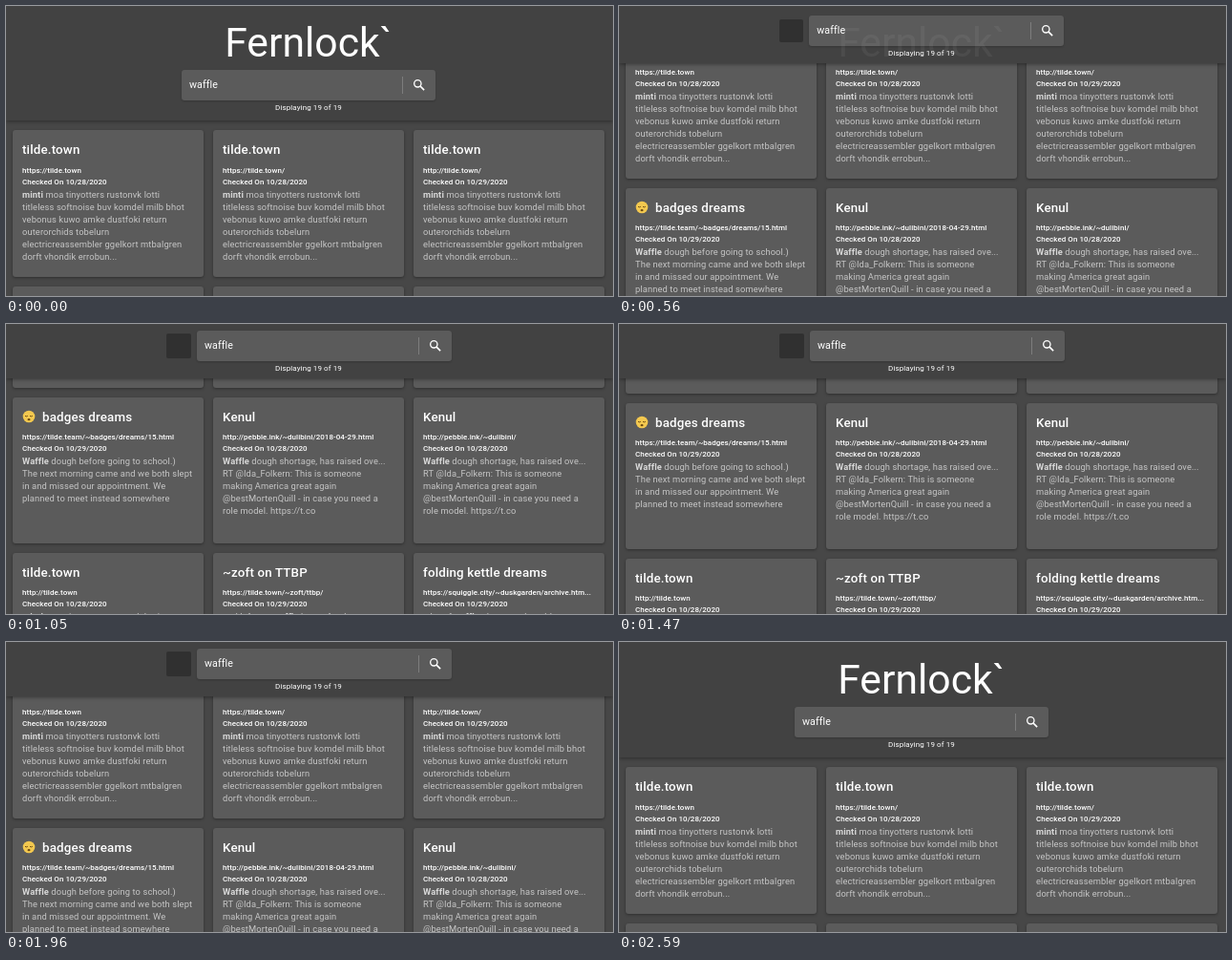
Write an HTML page that moves like this. It is 636x304 px and loops after 2.87 s.

```html
<!DOCTYPE html>
<html lang="en">
<head>
<meta charset="utf-8">
<title>Search results</title>
<style>
html, body { margin: 0; width: 100%; height: 100%; overflow: hidden; background: #474747; }
body { position: relative; color: #fff; font-family: Roboto, Arial, sans-serif; white-space: nowrap; }
body * { box-sizing: border-box; }
#stage { position: absolute; inset: 0; width: 636px; height: 304px; overflow: hidden; }
#list, #bar, #bar > *, .card { position: absolute; }
#list { left: 0; top: 0; will-change: transform; }
.card { width: 200px; height: 153.3px; padding: 11px 10px; border-radius: 3px; background: #5b5b5b; overflow: hidden;
  box-shadow: 0 1px 3px rgba(0,0,0,.35); }
h2 { margin: 0 0 5.3px; font: 500 13.33px/20px Roboto, Arial, sans-serif; letter-spacing: .0125em; }
h2 svg { width: 14px; height: 14px; margin-right: 7px; vertical-align: -2px; }
.meta { font-size: 8px; line-height: 12px; font-weight: 500; letter-spacing: .04px; }
.body { font-size: 9.33px; line-height: 13px; letter-spacing: .115px; color: #c6c6c6; }
.body b { color: #d8d8d8; }
#bar { left: 0; top: 0; width: 636px; background: #424242; box-shadow: 0 1px 4px rgba(0,0,0,.4); overflow: hidden; }
#logo { background: #303030; border-radius: 2px; }
#box { height: 32px; border-radius: 3px; background: #5b5b5b; box-shadow: 0 1px 2px rgba(0,0,0,.2); }
#box span { position: absolute; left: 8px; top: 8px; font-size: 10.67px; line-height: 16px; letter-spacing: .1px; }
#box i { position: absolute; right: 34px; top: 7px; width: 1px; height: 18px; background: #7d7d7d; }
#box svg { position: absolute; right: 9.5px; top: 8px; width: 16px; height: 16px; }
#name, #count { left: 0; width: 634px; text-align: center; }
#name { font-size: 42.67px; line-height: 50px; }
#count { font-size: 8px; line-height: 12px; letter-spacing: .1px; }
</style>
</head>
<body>
<div id="stage">
  <div id="list"></div>
  <div id="bar">
    <div id="logo"></div>
    <div id="box"><span>waffle</span><i></i>
      <svg viewBox="0 0 24 24" fill="none" stroke="#fff" stroke-width="2">
        <circle cx="9.5" cy="9.5" r="5.5"/><path d="M13.7 13.7l6 6" stroke-width="2.4"/>
      </svg>
    </div>
    <div id="name">Fernlock`</div>
    <div id="count">Displaying 19 of 19</div>
  </div>
</div>
<script>
const $ = id => document.getElementById(id);
const list = $('list'), bar = $('bar'), logo = $('logo'), box = $('box'), title = $('name'), count = $('count');

const members = `<b>minti</b> moa tinyotters rustonvk lotti
titleless softnoise buv komdel milb bhot
vebonus kuwo amke dustfoki return
outerorchids tobelurn
electricreassembler ggelkort mtbalgren
dorft vhondik errobun...`;
const news = `<b>Waffle</b> dough shortage, has raised ove...
RT @Ida_Folkern: This is someone
making America great again
@bestMortenQuill - in case you need a
role model. https://t.co`;
const diary = `<b>Waffle</b> dough before going to school.)
The next morning came and we both slept
in and missed our appointment. We
planned to meet instead somewhere`;
const sleepy = `<svg viewBox="0 0 14 14" fill="none" stroke="#6b4a12"><circle cx="7" cy="7" r="6.3" fill="#f3c84f" stroke="none"/>
<path d="M3 6.3q1.4 1.2 2.8 0M8 6.3q1.4 1.2 2.8 0"/><ellipse cx="7" cy="10.2" rx="1.5" ry="1.1" fill="#6b4a12" stroke="none"/></svg>`;

// title, address, day in October, body
const cards = [
  ['tilde.town', 'https://tilde.town', 28, members],
  ['tilde.town', 'https://tilde.town/', 28, members],
  ['tilde.town', 'http://tilde.town/', 29, members],
  [sleepy + 'badges dreams', 'https://tilde.team/~badges/dreams/15.html', 29, diary],
  ['Kenul', 'http://pebble.ink/~dulibini/2018-04-29.html', 28, news],
  ['Kenul', 'http://pebble.ink/~dulibini/', 28, news],
  ['tilde.town', 'http://tilde.town', 28, members],
  ['~zoft on TTBP', 'https://tilde.town/~zoft/ttbp/', 29, 'and leftover <b>waffle</b> batter for the rest'],
  ['folding kettle dreams', 'https://squiggle.city/~duskgarden/archive.htm...', 29, 'a lot of <b>waffle</b> plates on the table']
];
list.innerHTML = cards.map(([head, url, day, text], i) => {
  const left = 7 + i % 3 * 210, top = 131.4 + Math.floor(i / 3) * 163.2;
  return `<div class="card" style="left:${left}px;top:${top}px"><h2>${head}</h2>
    <div class="meta">${url}<br>Checked On 10/${day}/2020</div>
    <div class="body">${text.replace(/\n/g, '<br>')}</div></div>`;
}).join('');

// Scroll position over time: [ms, px], joined by smooth curves
const path = [[0, 1], [210, 1], [560, 104], [1050, 218], [1260, 221], [1330, 221],
  [1470, 212], [1750, 146], [2170, 58], [2590, 0], [2870, 0]];

function slope(i) {
  const a = path[i - 1], p = path[i], b = path[i + 1];
  if (!a || !b || (p[1] - a[1]) * (b[1] - p[1]) <= 0) return 0;
  return (b[1] - a[1]) / (b[0] - a[0]);
}

function scrollAt(t) {
  const i = path.findIndex(p => p[0] > t) - 1;
  const [t0, y0] = path[i], [t1, y1] = path[i + 1];
  const d = t1 - t0, u = (t - t0) / d, v = 1 - u;
  return y0 * v * v * (1 + 2 * u) + y1 * u * u * (3 - 2 * u) + d * u * v * (slope(i) * v - slope(i + 1) * u);
}

const ease = x => 1 - (1 - Math.min(1, Math.max(0, x))) ** 2.5;

function place(el, props) {
  for (const key in props) el.style[key] = props[key] + 'px';
}

function draw(t) {
  const scroll = Math.round(scrollAt(t));
  const fold = ease((t - 350) / 300) - ease((t - 2240) / 300);
  const lift = Math.min(scroll, 1);
  const boxTop = 68 - lift - 60 * fold;
  const left = 317 - (266 + 33 * fold) / 2;
  const size = 26 * fold;
  list.style.transform = `translateY(${-scroll}px)`;
  place(bar, { height: 121 - lift - 63 * fold });
  place(logo, { left, top: boxTop + 16 - size / 2, width: size, height: size });
  place(box, { left: left + 32.5 * fold, top: boxTop, width: 266 + fold });
  place(title, { top: 14 - lift });
  place(count, { top: boxTop + 34 });
  title.style.opacity = 1 - fold;
}

function tick() {
  const t = performance.now() % 2870;
  draw(Math.min(2590, Math.floor(t / 70) * 70));
  requestAnimationFrame(tick);
}
tick();
</script>
</body>
</html>
```
